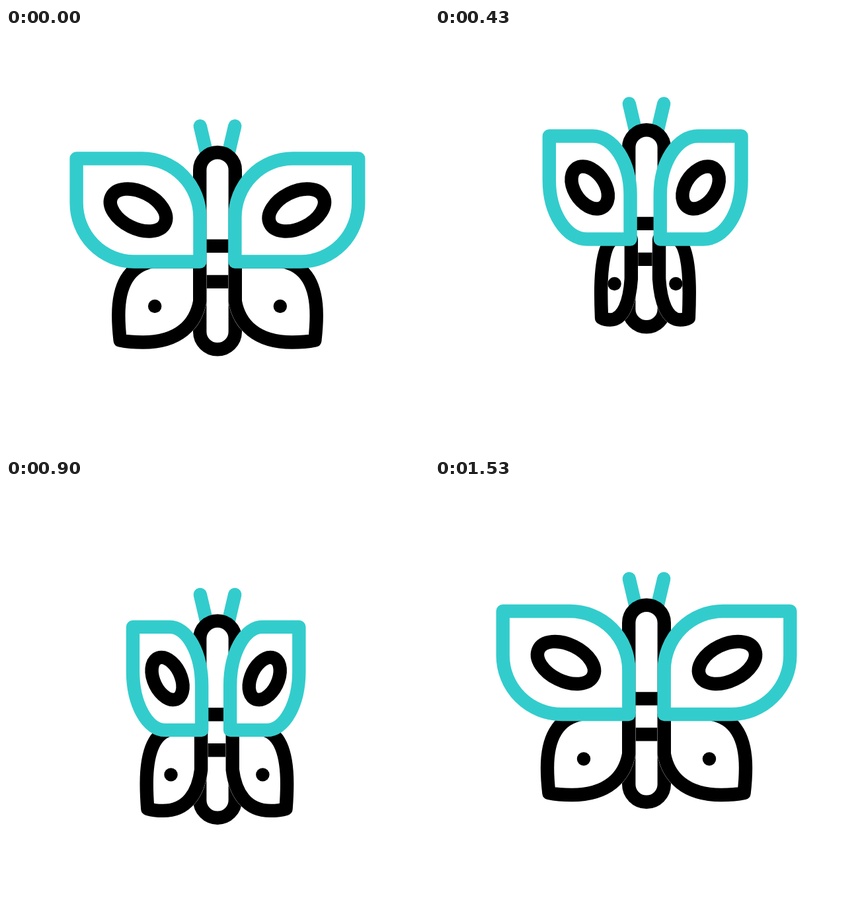
An HTML page with a canvas for the animation above (1670 ms loop, 640 by 640 pixels).

```html
<!DOCTYPE html>
<html lang="en">
<head>
<meta charset="utf-8">
<title>Butterfly</title>
<style>
  html, body { margin: 0; width: 100%; height: 100%; overflow: hidden; background: #fff; }
  canvas { display: block; width: 640px; height: 640px; }
</style>
</head>
<body>
<canvas id="stage"></canvas>
<script>
const SIZE = 640, LOOP = 1670, STEP = 100 / 3, LAST_STEP = 46, LINE = 20.4;
const TEAL = '#33cccc', BLACK = '#000', WHITE = '#fff';

const canvas = document.getElementById('stage');
const ctx = canvas.getContext('2d');
const ratio = window.devicePixelRatio || 1;
canvas.width = canvas.height = SIZE * ratio;

// Left half of the butterfly at rest; the right half is its mirror image.
const antenna = new Path2D('M293.8 151L303.2 191');
const upperWing = new Path2D('M102.7 200H204.3A89 89 0 0 1 293.3 289V356H191.7A89 89 0 0 1 102.7 267Z');
const ring = new Path2D();
ring.ellipse(198, 278, 45.9, 27.7, Math.PI * 26 / 180, 0, Math.PI * 2);
const lowerWing = new Path2D('M222 355.7C184 362 170 395 170 437C170 450 171 463 172.4 475' +
  'C182 477 194 478 207 478C262 478 287 450 293.2 416V355.7Z');
const dot = new Path2D('M225 423.5h.01');
const bars = new Path2D('M293.2 332.4H346.8M293.2 386.4H346.8');
const body = new Path2D();
body.roundRect(293.2, 190.7, 53.6, 298.1, 26.8);

// Keys are [step, value] at 30 steps per second.
const lift = [[-1, 0], [8.2, -76.3], [22, 66.5], [33.4, -37.8], [47.2, .8]];
const upperFold = [[-1, 1], [8, .4245], [19.9, 1], [30, .4245], [40, 1]];
const lowerFold = [[-.4, 1], [11.6, .338], [22, 1], [32, .338], [42, 1]];

function valueAt(keys, step) {
  if (step <= keys[0][0]) return keys[0][1];
  for (let i = 1; i < keys.length; i++) {
    const [start, from] = keys[i - 1];
    const [end, to] = keys[i];
    if (step < end) {
      const u = (step - start) / (end - start);
      return from + (to - from) * u * u * (3 - 2 * u);
    }
  }
  return keys[keys.length - 1][1];
}

// Scales only the outline in x, so line weights stay constant.
function folded(path, pivot, scale) {
  const result = new Path2D();
  result.addPath(path, new DOMMatrix([scale, 0, 0, 1, pivot * (1 - scale), 0]));
  return result;
}

function stroke(path, color, width = LINE) {
  ctx.strokeStyle = color;
  ctx.lineWidth = width;
  ctx.stroke(path);
}

function fill(path) {
  ctx.fillStyle = WHITE;
  ctx.fill(path);
}

function bothSides(paint) {
  paint(false);
  ctx.save();
  ctx.translate(SIZE, 0);
  ctx.scale(-1, 1);
  paint(true);
  ctx.restore();
}

function draw(step) {
  const upper = valueAt(upperFold, step);
  const lower = valueAt(lowerFold, step);

  ctx.setTransform(ratio, 0, 0, ratio, 0, 0);
  ctx.fillStyle = WHITE;
  ctx.fillRect(0, 0, SIZE, SIZE);
  ctx.translate(0, valueAt(lift, step));
  ctx.lineJoin = ctx.lineCap = 'round';

  bothSides(() => stroke(antenna, TEAL));

  fill(body);
  ctx.lineCap = 'butt';
  stroke(bars, BLACK);
  stroke(body, BLACK);
  ctx.lineCap = 'round';

  bothSides(right => {
    const pivot = right ? 305.5 : 299;
    const wing = folded(lowerWing, pivot, lower);
    stroke(wing, WHITE, LINE + .5); // hairline where wing meets body
    fill(wing);
    stroke(wing, BLACK);
    stroke(folded(dot, pivot, lower), BLACK);
  });

  bothSides(right => {
    const pivot = right ? 310 : 299.6;
    const wing = folded(upperWing, pivot, upper);
    fill(wing);
    stroke(wing, TEAL);
    stroke(folded(ring, pivot, upper), BLACK);
  });
}

// The pose holds still after the last step until the loop restarts.
function tick() {
  const time = performance.now() % LOOP;
  draw(Math.min(Math.floor((time + 5) / STEP), LAST_STEP));
  requestAnimationFrame(tick);
}
tick();
</script>
</body>
</html>
```
